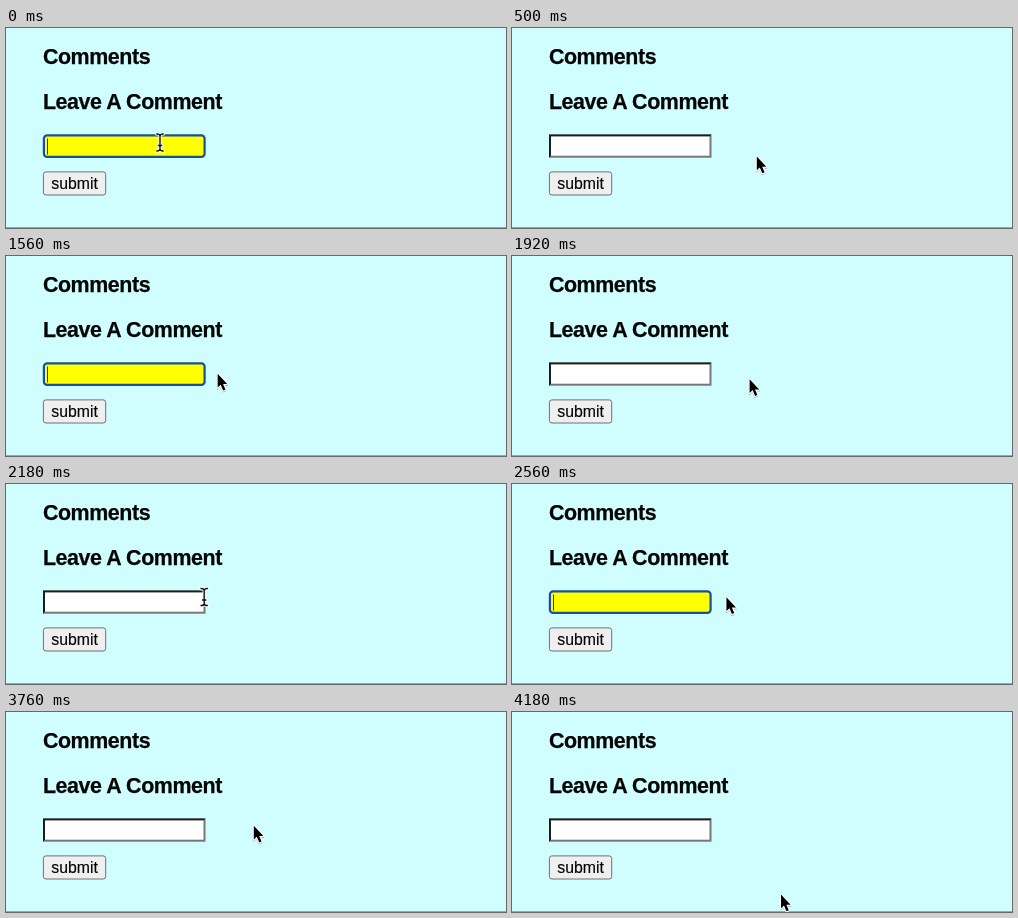
These frames come from a looping animation (500 px wide and 200 px high, 4.72 s). An HTML page:

```html
<!DOCTYPE html>
<html lang="en">
<head>
<meta charset="utf-8">
<title>Leave A Comment</title>
<style>
  html, body { margin: 0; width: 100%; height: 100%; overflow: hidden; background: #d0feff; }
  svg { display: block; width: 500px; height: 200px; }
  text { font-family: "Liberation Sans", Arial, sans-serif; fill: #050505; stroke: #050505; }
  .title { font-size: 21.4px; font-weight: bold; letter-spacing: -0.4px; stroke-width: 0.25px; }
  .label { font-size: 15.8px; stroke-width: 0.15px; }
</style>
</head>
<body>
<svg viewBox="0 0 500 200">
  <defs>
    <filter id="shade" x="-50%" y="-50%" width="200%" height="200%">
      <feDropShadow dx="0" dy="0.8" stdDeviation="0.7" flood-color="#000" flood-opacity="0.35"/>
    </filter>
    <path id="bar" d="M-3 -8.5Q-0.3 -8.5 0 -6.5Q0.3 -8.5 3 -8.5M0 -6.5V6.5M-3 8.5Q-0.3 8.5 0 6.5Q0.3 8.5 3 8.5M-1.5 3H1.5"/>
  </defs>
  <rect width="500" height="200" fill="#d0feff"/>
  <rect y="199" width="500" height="1" fill="#98a6a8"/>

  <text class="title" x="36.9" y="35.8">Comments</text>
  <text class="title" x="36.9" y="80.8">Leave A Comment</text>

  <g id="idle">
    <rect x="37" y="106.5" width="162.5" height="23.2" fill="#777"/>
    <path d="M37 129.7V106.5H199.5L197.5 108.5H39V127.7Z" fill="#1c1c1c"/>
    <rect x="39" y="108.5" width="158.5" height="19.2" fill="#fff"/>
  </g>
  <g id="active">
    <rect x="37.9" y="107.4" width="160.7" height="21.5" rx="3.2" fill="#ff0" stroke="#17519b" stroke-width="2.2"/>
    <rect x="41" y="110.5" width="1" height="16" fill="#333"/>
  </g>

  <rect x="37.4" y="143.9" width="62.3" height="23.1" rx="2.5" fill="#efefef" stroke="#6c7070"/>
  <text class="label" x="45.3" y="160.5">submit</text>

  <g id="arrow" filter="url(#shade)">
    <path d="M0 0V13.8L3 10.9L5.5 16.7L7.8 15.7L5.4 10.2H9.6Z"
      fill="#000" stroke="#fff" stroke-width="2" stroke-linejoin="round" paint-order="stroke"/>
  </g>
  <g id="beam" fill="none" stroke-linecap="square">
    <use href="#bar" stroke="#fff" stroke-width="3.2"/>
    <use href="#bar" stroke="#111" stroke-width="1.4"/>
  </g>
</svg>
<script>
const LOOP = 4720, TICK = 20;

const home = { x: 154, y: 114.5 };
// each move eases from the last resting place; bow bends it up or down
const moves = [
  { from: 0, to: 460, x: 244.8, y: 128.5, bow: 0 },
  { from: 780, to: 1160, x: 162, y: 115, bow: 12 },
  { from: 1440, to: 1840, x: 237.6, y: 123.2, bow: -3 },
  { from: 1980, to: 2220, x: 198, y: 113, bow: 0 },
  { from: 2540, to: 2700, x: 247.8, y: 113.8, bow: 0 },
  { from: 3900, to: 4180, x: 269, y: 182.6, bow: 0 }
];
// the field starts focused; each click toggles it
const clicks = [480, 1180, 1900, 2240, 2780];

const el = id => document.getElementById(id);
const show = (id, on) => el(id).style.display = on ? "" : "none";
const easeOut = k => 1 - (1 - k) ** 3;

function pointer(t) {
  let { x, y } = home;
  for (const m of moves) {
    if (t < m.from) break;
    const e = easeOut(Math.min(1, (t - m.from) / (m.to - m.from)));
    x += (m.x - x) * e;
    y += (m.y - y) * e + m.bow * Math.sin(Math.PI * e);
  }
  return [x, y];
}

function draw(t) {
  const [x, y] = pointer(t);
  const over = x > 37 && x < 199.5 && y > 106 && y < 130;
  const active = clicks.filter(c => c <= t).length % 2 === 0;
  show("active", active);
  show("idle", !active);
  show("beam", over);
  show("arrow", !over);
  el(over ? "beam" : "arrow").setAttribute("transform", `translate(${x} ${y})`);
}

const start = performance.now();
function frame() {
  const t = (performance.now() - start) % LOOP;
  draw(Math.floor(t / TICK) * TICK);
  requestAnimationFrame(frame);
}
frame();
</script>
</body>
</html>
```
